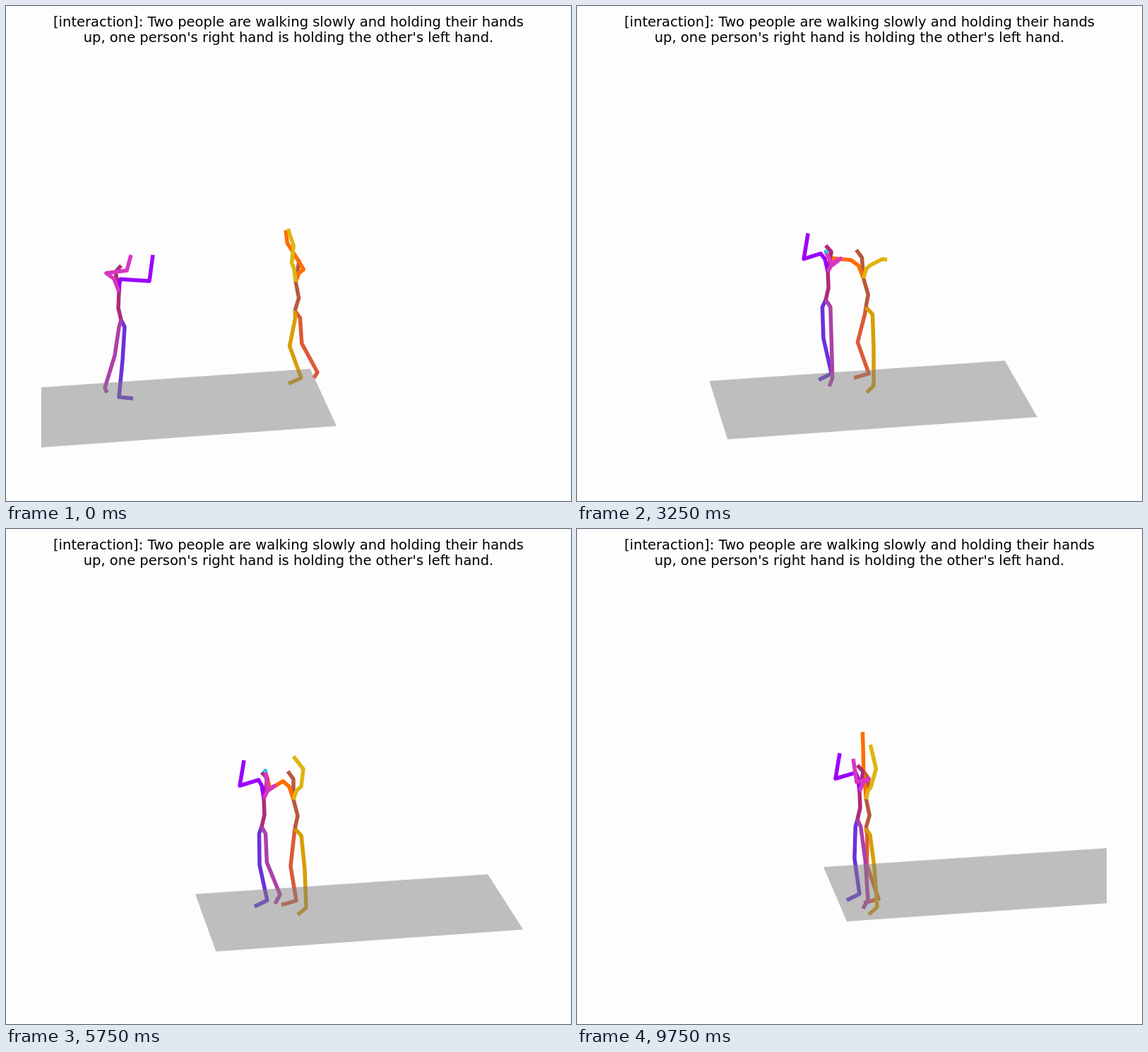
Write an HTML page with a canvas that moves like this. It is 800x700 px and loops after 9800 ms.

```html
<!DOCTYPE html>
<html lang="en">
<head>
<meta charset="utf-8">
<title>Two walking figures</title>
<style>
html, body { margin: 0; width: 100%; height: 100%; overflow: hidden; background: #fdfdfd; }
canvas { display: block; }
</style>
</head>
<body>
<canvas id="stage" width="800" height="700"></canvas>
<script>
const ctx = document.getElementById('stage').getContext('2d');
const LOOP = 9800, STEP = 50;

// Smooth motion through keys [time, ...values]; never overshoots, holds after the last key.
function track(...keys) {
  const slope = (i, c) => (keys[i + 1][c] - keys[i][c]) / (keys[i + 1][0] - keys[i][0]);
  const tangent = (i, c) => {
    if (i === 0) return slope(0, c);
    if (i === keys.length - 1) return 0;
    const a = slope(i - 1, c), b = slope(i, c);
    return a * b > 0 ? 2 * a * b / (a + b) : 0;
  };
  return t => {
    let i = 0;
    while (i < keys.length - 2 && t >= keys[i + 1][0]) i++;
    const [from, to] = [keys[i], keys[i + 1]], span = to[0] - from[0];
    const u = Math.min(1, Math.max(0, (t - from[0]) / span)), v = 1 - u;
    return from.slice(1).map((_, n) => {
      const c = n + 1;
      return v * v * (1 + 2 * u) * from[c] + u * u * (3 - 2 * u) * to[c]
        + span * u * v * (v * tangent(i, c) - u * tangent(i + 1, c));
    });
  };
}

const add = (a, b) => [a[0] + b[0], a[1] + b[1]];
const mix = (a, b, k) => [a[0] + (b[0] - a[0]) * k, a[1] + (b[1] - a[1]) * k];

// Ankles are relative to the root, elbows and wrists to the chest, toes to the ankle.
// Spine joints are x, y and how far the lean shifts them sideways.
const purple = {
  colors: { spine: '#af2b79', legs: ['#6b31db', '#ad40a8'], arms: ['#9b00ff', '#d836c1'] },
  root: track([0, 163, 444], [1150, 285, 428], [2300, 341, 419], [4200, 358, 414],
    [5750, 362, 421], [7250, 369, 418], [9750, 397, 411]),
  heading: track([0, -30], [1150, 90], [2300, 125], [4200, 140], [9750, 152]),
  lean: track([0, -1], [1150, 0.1], [2300, 1]),
  hipShift: 1,
  spine: [[0, -17, 4], [0, -40, 3], [0, -68, 8], [0, -77, 0]],
  sides: [{
    elbow: track([0, 43, -15], [1150, -30, -1], [2300, -34, -18]),
    wrist: track([0, 48, -52], [1150, -13, -28], [2300, -28, -54]),
    ankle: track([0, -3, 109], [1150, -16, 107], [2300, -5, 106], [4200, 13, 103], [7250, 3, 105]),
    toe: track([0, 20, 2], [1150, -10, 8], [2300, -18, 9])
  }, {
    elbow: track([0, 11, -30], [1150, 42, -4], [2300, 7, -8], [5750, 6, -11], [9750, -4, -13]),
    wrist: track([0, 17, -52], [1150, 26, -34], [2300, 3, -28], [4200, -5, -28], [5750, 2, -39], [9750, -9, -46]),
    ankle: track([0, -23, 96], [1150, 4, 107], [2300, 14, 108], [4200, 9, 112],
      [5750, 26, 96], [7250, 38, 96], [9750, 15, 113]),
    toe: track([0, 3, 7], [1150, 15, 5], [2300, 1, 10], [4200, -7, 13])
  }]
};
const orange = {
  colors: { spine: '#b75a39', legs: ['#dd5a37', '#d69e00'], arms: ['#ff6d00', '#ddb50e'] },
  root: track([0, 409, 431], [2300, 409, 427], [7250, 409, 423]),
  heading: track([0, -25], [1150, 100], [2300, 135], [5750, 140], [9750, 165]),
  lean: track([0, 0.8], [1150, -0.2], [2300, -1], [4200, 0.3], [5750, 0], [9750, 0.6]),
  hipShift: 4,
  spine: [[4, -18, 2], [-2, -41, 4], [-2, -70, 10], [-10, -81, 10]],
  sides: [{
    elbow: track([0, -12, -55], [1150, -36, -12], [2300, -51, -31], [4200, -45, -24],
      [5750, -33, -15], [7250, -29, -17], [9750, -4, -62]),
    wrist: track([0, -14, -73], [1150, -36, -19], [9750, -5, -95]),
    ankle: track([0, 32, 87], [1150, 24, 82], [2300, 3, 99], [4200, 2, 89],
      [5750, 2, 102], [7250, 2, 97], [9750, 18, 100]),
    toe: track([0, -5, 8], [1150, -10, 15], [2300, -21, 6])
  }, {
    elbow: track([0, -3, -51], [1150, 39, -32], [2300, 41, -34], [4200, 12, -20], [5750, 14, -43]),
    wrist: track([0, -11, -75], [1150, 37, -44], [2300, 55, -25], [4200, 8, -29],
      [5750, 0, -61], [9750, 6, -77]),
    ankle: track([0, 9, 95], [1150, -11, 107], [2300, 18, 114], [4200, 8, 108], [5750, 16, 112]),
    toe: track([0, -18, 8], [1150, 0, 13], [2300, -6, 9], [4200, -12, 10])
  }]
};
const grip = track([1150, 0], [2250, 1], [8000, 1], [9750, 0]);

// Back left corner x and front left corner y.
const floorPath = track([0, 9, 626], [500, 50, 636], [1150, 106, 627], [2000, 161, 622], [2300, 166, 621],
  [3000, 179, 616], [4200, 229, 600], [5750, 268, 597.5], [7250, 297, 580.5], [8000, 333, 566], [9000, 349, 557],
  [9750, 349, 555]);

function pose(figure, t, heldHand) {
  const root = figure.root(t), [lean] = figure.lean(t);
  const angle = figure.heading(t)[0] * Math.PI / 180;
  const width = Math.sin(angle), depth = Math.cos(angle);
  const spine = [root, ...figure.spine.map(([x, y, sway]) => add(root, [x + sway * lean, y]))];
  const chest = spine[2];
  const stride = 8 * Math.exp(-t / 2500) * Math.sin(2 * Math.PI * t / 1150);

  const legs = figure.sides.map((limb, n) => {
    const side = n ? 1 : -1;
    const hip = add(root, [figure.hipShift + side * 8 * width, 10]);
    const [x, y] = limb.ankle(t), toe = limb.toe(t);
    const ankle = add(root, [x + side * stride, y]);
    // A raised foot pushes the knee out towards the toes.
    const bend = Math.max(-1, Math.min(1, toe[0] / 10)) * (110 - y) * 0.8;
    return [root, hip, add(mix(hip, ankle, 0.47), [bend, 0]), ankle, add(ankle, toe)];
  });
  const arms = figure.sides.map((limb, n) => {
    const side = n ? 1 : -1;
    const x = 6 * lean - 2 + side * 20 * width, y = -22 - side * 5 * depth;
    const wrist = add(chest, limb.wrist(t));
    return [chest, add(chest, [x * 0.4, y * 0.7]), add(chest, [x, y]), add(chest, limb.elbow(t)),
      heldHand && !n ? mix(wrist, heldHand, grip(t)[0]) : wrist];
  });
  return { spine, legs, arms };
}

function line(points, color) {
  ctx.beginPath();
  points.forEach(p => ctx.lineTo(...p));
  ctx.strokeStyle = color;
  ctx.stroke();
}

function drawFigure({ spine, legs, arms }, colors) {
  legs.forEach((leg, n) => line(leg, colors.legs[n]));
  line(spine, colors.spine);
  arms.forEach((arm, n) => line(arm, colors.arms[n]));
}

function drawFloor(t) {
  const [x, y] = floorPath(t);
  const near = y - 555, depth = 77 + near * 0.098;
  const right = x + 403 + near * 0.265;
  const top = y - depth, rightTop = top - 27 - near * 0.028;
  ctx.save();
  ctx.beginPath();
  ctx.rect(50, 0, 700, 700);
  ctx.clip();
  ctx.beginPath();
  ctx.moveTo(x, top);
  ctx.lineTo(right, rightTop);
  ctx.lineTo(right + 36.7 + x * 0.05, rightTop + depth * 0.964);
  ctx.lineTo(x + 17.2 + x * 0.0453, y);
  ctx.fillStyle = 'rgba(128, 128, 128, 0.5)';
  ctx.fill();
  ctx.restore();
}

function draw(t) {
  ctx.fillStyle = '#fdfdfd';
  ctx.fillRect(0, 0, 800, 700);
  ctx.lineWidth = 5.5;
  ctx.lineJoin = 'round';
  const left = pose(purple, t), hand = left.arms[1][4];
  drawFigure(pose(orange, t, hand), orange.colors);
  drawFigure(left, purple.colors);
  if (grip(t)[0] > 0.95) {
    ctx.beginPath();
    ctx.arc(...hand, 3, 0, 2 * Math.PI);
    ctx.fillStyle = '#34c1e2';
    ctx.fill();
  }
  drawFloor(t);
  ctx.fillStyle = '#000';
  ctx.font = '19.5px "DejaVu Sans", sans-serif';
  ctx.textAlign = 'center';
  ctx.fillText('[interaction]: Two people are walking slowly and holding their hands', 400, 29);
  ctx.fillText("up, one person's right hand is holding the other's left hand.", 400, 51);
}

const start = performance.now();
function tick() {
  const elapsed = (performance.now() - start) % LOOP;
  draw(Math.floor(elapsed / STEP) * STEP);
  requestAnimationFrame(tick);
}
tick();
</script>
</body>
</html>
```
